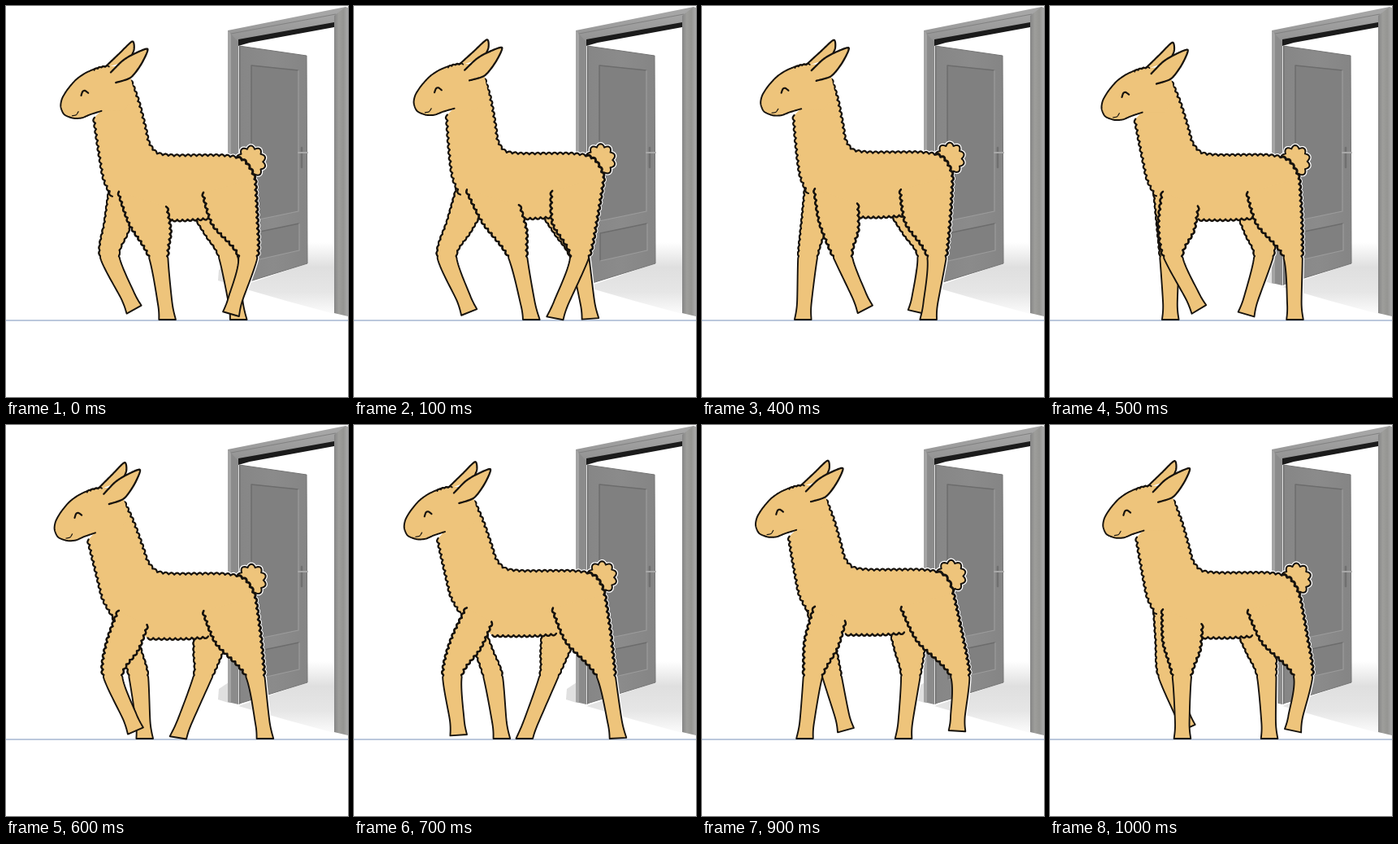
Recreate the animation shown at these times as an HTML page with a canvas. Size 421 px wide and 480 px high, loop 1100 ms.

```html
<!DOCTYPE html>
<html lang="en">
<head>
<meta charset="utf-8">
<title>Walking alpaca</title>
<style>
html, body { margin: 0; width: 100%; height: 100%; overflow: hidden; background: #fff; }
canvas { display: block; }
</style>
</head>
<body>
<canvas id="stage" width="421" height="480"></canvas>
<script>
const ctx = document.getElementById('stage').getContext('2d');
const STEP = 100, STEPS = 11;
const GROUND = 385, KNEE = 307;
const COAT = '#eec47b', INK = '#17130e';

// Gait shared by each pair: stance length in steps, how far the knee
// follows the hoof, and the size and lag of the knee bend in the swing.
const FORE = { stance: 4.5, follow: .7, offset: 0, bend: -29, lag: 2, lift: 13 };
const HIND = { stance: 5.6, follow: .43, offset: 9, bend: 14, lag: 1, lift: 10 };

// Each leg: hoof range (ahead to behind), step of landing, tops of both edges
const nearFore = { ...FORE, ahead: 103, behind: 219, plant: 7.7, front: [138, 226], back: [187, 244], drag: .42, plump: [5, 4], bump: 2.1 };
const farFore = { ...FORE, ahead: 107, behind: 182, plant: 2.6, front: [127, 220], back: [160, 250], drag: 0, plump: [0, 0], bump: 1.2 };
const nearHind = { ...HIND, ahead: 237, behind: 325, plant: 1.3, front: [242, 227], back: [307, 210], drag: 0, plump: [10, 1], bump: 2.3 };
const farHind = { ...HIND, ahead: 205, behind: 291, plant: 6.2, front: [231, 256], back: [279, 250], drag: 0, plump: [0, 0], bump: 1.2 };

const mix = (a, b, k) => a + (b - a) * k;
const mid = (a, b) => [mix(a[0], b[0], .5), mix(a[1], b[1], .5)];
const pairs = list => list.reduce((out, v, i) => (i % 2 ? out[out.length - 1].push(v) : out.push([v]), out), []);

// Smooth curve through the points
function curve(pts, n = 16) {
  const out = [pts[0]];
  for (let i = 0; i < pts.length - 1; i++) {
    const b = pts[i], c = pts[i + 1], a = pts[i - 1] || b, d = pts[i + 2] || c;
    for (let s = 1; s <= n; s++) {
      const t = s / n, u = t * t, w = u * t;
      out.push([0, 1].map(q =>
        (2 * w - 3 * u + 1) * b[q] + (w - 2 * u + t) * .4 * (c[q] - a[q]) +
        (3 * u - 2 * w) * c[q] + (w - u) * .4 * (d[q] - b[q])));
    }
  }
  return out;
}

// Turns a dense line into a row of outward bumps
function wool(line, side, size = 7, height = 2.2) {
  let total = 0;
  const at = line.map((p, i) => i ? total += Math.hypot(p[0] - line[i - 1][0], p[1] - line[i - 1][1]) : 0);
  const count = Math.max(1, Math.round(total / size));
  const out = [];
  for (let s = 0, i = 0; s <= count * 8; s++) {
    const d = total * s / (count * 8);
    while (i < line.length - 2 && at[i + 1] < d) i++;
    const a = line[i], b = line[i + 1];
    const len = at[i + 1] - at[i] || 1, k = (d - at[i]) / len;
    const h = side * height * (Math.abs(Math.sin(Math.PI * s / 8)) - .5);
    out.push([mix(a[0], b[0], k) - (b[1] - a[1]) / len * h, mix(a[1], b[1], k) + (b[0] - a[0]) / len * h]);
  }
  return out;
}

function trace(pts, closed) {
  ctx.beginPath();
  pts.forEach(p => ctx.lineTo(p[0], p[1]));
  if (closed) ctx.closePath();
}
function fill(pts, color = COAT) {
  trace(pts, true);
  ctx.fillStyle = color;
  ctx.fill();
}
function line(pts, width = 2, color = INK) {
  trace(pts);
  ctx.lineWidth = width;
  ctx.strokeStyle = color;
  ctx.stroke();
}
function shade(x0, y0, x1, y1, ...colors) {
  const g = ctx.createLinearGradient(x0, y0, x1, y1);
  colors.forEach((c, i) => g.addColorStop(i / (colors.length - 1), c));
  return g;
}
const poly = (color, ...xy) => fill(pairs(xy), color);

function panel(x0, x1, topL, topR, botR, botL) {
  poly('#808080', x0, topL, x1, topR, x1, botR, x0, botL);
  line([[x0, botL], [x0, topL], [x1, topR]], 1.4, '#6c6c6c');
  line([[x1, topR], [x1, botR], [x0, botL]], 1.2, '#9c9c9c');
}

function door() {
  const floor = shade(0, 290, 0, 382, '#ffffff', '#dfdfdf', '#e6e6e6', '#ffffff');
  poly(floor, 371, 290, 404, 290, 404, 378, 345, 362, 286, 345, 371, 316);
  poly('#e0e0e0', 274, 316, 262, 324, 261, 337, 274, 341);
  poly('#8b8b8b', 273, 30, 286, 38, 286, 343, 273, 340);
  poly('#a4a4a4', 273, 30, 277, 32, 277, 341, 273, 340);
  poly(shade(0, 10, 0, 40, '#a6a6a6', '#949494'), 273, 30, 418, 1, 418, 12, 404, 22, 285, 43);
  line([[277, 34], [406, 10]], 1.2, '#828282');
  poly('#1b1b1b', 286, 41, 404, 20, 404, 26, 300, 45, 286, 49);
  poly(shade(404, 0, 421, 0, '#858585', '#9e9e9b', '#959592', '#aaaaaa'), 404, 12, 418, 1, 421, 2, 421, 381, 404, 377);
  poly(shade(287, 0, 371, 0, '#868686', '#8b8b8b', '#858585'), 287, 49, 370, 61, 371, 316, 287, 342);
  line([[287.5, 49], [287.5, 342]], 1.4, '#666666');
  line([[287, 49], [370, 61], [371, 316], [287, 342]], 1, '#757575');
  panel(302, 360, 73, 79, 252, 264);
  panel(303, 361, 279, 267, 300, 313);
  line([[364, 174], [364, 198]], 2.5, '#707070');
  line([[360, 180], [371, 180]], 2, '#a8a8a8');
}

// Where hoof and knee are: glide back on the ground, then swing forward
function stride(leg, step) {
  const t = (step - leg.plant + STEPS) % STEPS;
  const swing = t > leg.stance;
  const u = swing ? (t - leg.stance) / (STEPS - leg.stance) : t / leg.stance;
  const hoof = swing ? mix(leg.behind, leg.ahead, u ** 2.2) : mix(leg.ahead, leg.behind, u * u * (3 - 2 * u));
  const air = swing ? Math.sin(Math.PI * u) : 0;
  const bend = swing ? leg.bend * Math.sin(Math.PI * u ** leg.lag) : 0;
  const center = (leg.ahead + leg.behind) / 2;
  const pull = (hoof - center) * leg.follow + bend;
  return { hoof: [hoof, GROUND - leg.lift * air], knee: [center + leg.offset + pull, KNEE], pull, air };
}

function makeLeg(leg, step, [dx, dy]) {
  const { hoof, knee, pull, air } = stride(leg, step);
  const lean = Math.atan2(hoof[0] - knee[0], hoof[1] - knee[1]);
  const tilt = lean * Math.sqrt(air) * 1.2;
  const ankle = [mix(knee[0], hoof[0], .75), mix(knee[1], hoof[1], .75)];

  // One edge of the leg; side is -1 for the front and 1 for the back
  const edge = (top, side, plump) => {
    const off = ([x, y], w, a) => [x + side * w * Math.cos(a), y - side * w * Math.sin(a)];
    const bendPt = off(knee, 12, 0), thigh = mid(top, bendPt);
    const dense = curve([top, [thigh[0] + side * plump, thigh[1]], bendPt, off(ankle, 8.8, lean), off(hoof, 10.3, tilt)]);
    const upper = wool(dense.slice(0, 33), -side, 7, leg.bump);
    return { top: upper, all: upper.concat(dense.slice(33)) };
  };
  const haunch = [leg.back[0] + dx + leg.drag * pull, leg.back[1] + dy];
  return {
    haunch, rough: leg.bump,
    front: edge([leg.front[0] + dx, leg.front[1] + dy], -1, leg.plump[0]),
    back: edge(haunch, 1, leg.plump[1])
  };
}
function drawLeg({ front, back, rough }) {
  const round = [...front.all, ...back.all.slice().reverse()];
  fill(round);
  line(round, 1.9);
  line(front.top, 1.4 + rough / 2);
  line(back.top, 1.4 + rough / 2);
}

function face({ x, y, turn }) {
  ctx.save();
  ctx.translate(71 + x, 118 + y);
  ctx.rotate(turn);
  ctx.scale(.98, .98);
  ctx.translate(-71, -118);
  const far = curve(pairs([126,74, 146,56, 163,41, 165,51, 159,64]));
  fill(far);
  line(far, 2.2);
  const skull = curve(pairs([130,71, 118,73, 103,79, 91,87, 80,99, 73,110, 71,120, 75,130, 86,135, 97,135, 108,131, 122,127]));
  fill([...skull, [150, 128], [165, 110], [160, 88], [150, 72]]);
  line(skull, 2);
  line(wool(curve(pairs([114,75, 123,72, 133,71])), -1, 5, 1.6), 1.8);
  const near = curve(pairs([135,79, 150,65, 164,57, 182,51, 174,69, 160,86, 141,92]));
  fill(near);
  line(near, 2.3);
  line(curve(pairs([97,107, 99,102, 102,101, 106,104])), 2.2);
  line(curve(pairs([85,132, 90,131, 93,127])), 1.2);
  ctx.restore();
}

function alpaca(step) {
  // The trunk bobs twice per cycle, the head swings once
  const bob = Math.cos(4 * Math.PI * (step - 2.7) / STEPS);
  const nod = Math.cos(2 * Math.PI * (step - 2) / STEPS);
  const sink = -1.3 - 3.5 * bob, sway = 3.2 + 3.2 * bob;
  const head = { x: -2.5 + 8 * nod + 4.5 * bob, y: 2 - 5 * nod - 3.5 * bob, turn: (-1 + 1.5 * nod + 1.2 * bob) * Math.PI / 180 };

  const limb = (leg, move) => makeLeg(leg, step, [move, sink]);
  const rearFar = limb(farHind, 0), foreFar = limb(farFore, 0);
  const fore = limb(nearFore, 0), rear = limb(nearHind, sway * .5);

  // Neck points follow the head by weight w and the body by the rest
  const warp = ([x, y, w]) => {
    const c = Math.cos(head.turn) * .98, s = Math.sin(head.turn) * .98;
    const u = x - 71, v = y - 118;
    return [mix(x, 71 + head.x + u * c - v * s, w), mix(y + sink, 118 + head.y + u * s + v * c, w)];
  };
  const throat = wool(curve([[112, 135, 1], [114, 160, .75], [117, 188, .45], [121, 212, .25], [130, 232, 0]].map(warp)), 1);
  const nape = [[160, 89, 1], [168, 116, .8], [174, 148, .45], [177, 166, .2], [186, 178, 0]].map(warp);
  const spine = pairs([205,181, 235,181, 265,181, 283,183]).map(([x, y]) => [x + sway * (x - 186) / 100, y + sink]);
  const back = wool(curve([...nape, ...spine]), -1);
  const rump = wool(curve([[284 + sway, 183 + sink], [294 + sway, 188 + sink], [302 + sway * .8, 199 + sink], rear.haunch]), -1, 8);
  const belly = wool(curve([[fore.haunch[0], 261 + sink], [220, 261 + sink], [249, 259 + sink]]), 1, 6.5);

  const ring = [];
  for (let i = 0; i <= 60; i++) {
    const a = Math.PI * (i / 30 - 1);
    ring.push([301.5 + sway + 16.5 * Math.cos(a), 189 + sink + 18 * Math.sin(a)]);
  }
  const tail = wool(ring, -1, 11, 3.6);

  [tail, back, rump, rear.back.all, rearFar.back.all].forEach(p => line(p, 4.5, '#fff'));
  line([[0, 386], [421, 386]], 1.4, '#a5b6d0');

  drawLeg(rearFar);
  drawLeg(foreFar);
  fill(tail);
  line(tail, 2);
  fill([...throat, ...belly, [295, 250 + sink], ...rump.slice().reverse(), ...back.slice().reverse()]);
  line(belly, 2.4);
  drawLeg(fore);
  drawLeg(rear);
  line(throat, 2.2);
  line(back, 2.2);
  line(rump, 3);
  face(head);
}

function draw() {
  const step = Math.floor(performance.now() / STEP) % STEPS;
  ctx.fillStyle = '#fff';
  ctx.fillRect(0, 0, 421, 480);
  ctx.lineJoin = ctx.lineCap = 'round';
  door();
  alpaca(step);
  requestAnimationFrame(draw);
}
draw();
</script>
</body>
</html>
```
